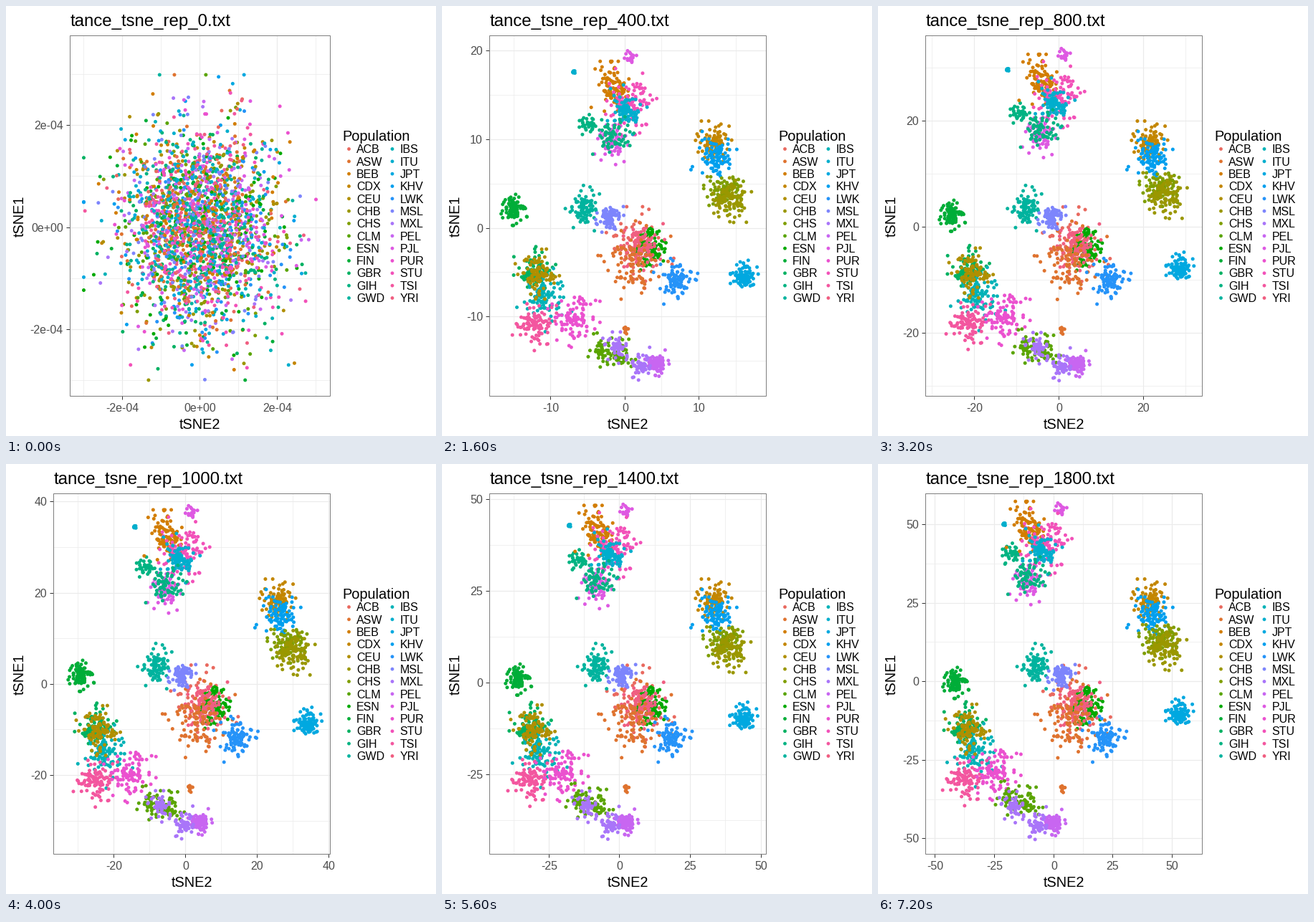
Write a matplotlib script that moves like this. It is 600 by 600 pixels and loops after 8 s.

```python
import math
from itertools import product

import matplotlib.pyplot as plt
import numpy as np
from matplotlib.animation import FuncAnimation
from matplotlib.patches import Rectangle

SIZE, FRAMES = 600, 10
PT = 0.72                      # points per pixel at 100 dpi
RIGHT, TOP, BOTTOM = 452.5, 41.5, 544.5
PER_POP = 96
CENTRE = np.array([255, 310])
plt.rcParams["font.family"] = "Liberation Sans"

NAMES = ("ACB ASW BEB CDX CEU CHB CHS CLM ESN FIN GBR GIH GWD "
         "IBS ITU JPT KHV LWK MSL MXL PEL PJL PUR STU TSI YRI").split()

# Blobs (population, x, y, radius) that drift together by (dx, dy).
GROUPS = [
    ((0, 0), [("CDX", 379, 189, 9), ("KHV", 381, 213, 12)]),
    ((-1, -14), [("CHS", 396, 259, 11), ("CHB", 401, 271, 11)]),
    ((-1, -29), [("JPT", 422, 377, 7)]),
    ((8, 21), [("FIN", 99, 284, 7)]),
    ((-8, -4), [("GBR", 129, 373, 12), ("IBS", 142, 407, 15),
                ("CEU", 133, 374, 11), ("TSI", 129, 446, 11)]),
    ((-21, -7), [("PUR", 184, 435, 13)]),
    ((-40, -14), [("CLM", 225, 480, 7.5), ("CLM", 249, 487, 7.5)]),
    ((-55, 2), [("PEL", 300, 499, 6), ("MXL", 244, 477, 7), ("MXL", 278, 500, 7.5)]),
    ((1, 1), [("ACB", 273, 337, 18), ("ESN", 291, 335, 11), ("YRI", 277, 333, 12),
              ("ASW", 266, 360, 19), ("ASW", 257, 451, 2)]),
    ((-10, 0), [("LWK", 326, 382, 11)]),
    ((22, 0), [("GWD", 199, 282, 10), ("MSL", 234, 297, 7)]),
    ((-18, -41), [("GIH", 203, 167, 6)]),
    ((-8, -8), [("PJL", 263, 72, 3), ("ITU", 184, 92, 1)]),
    ((-29, -25), [("BEB", 239, 112, 11), ("PJL", 239, 188, 11), ("STU", 265, 132, 15),
                  ("ITU", 256, 145, 11), ("GIH", 237, 183, 11)]),
]


def hcl(hue, chroma=100, lum=60):
    """Polar LUV colour as clipped sRGB."""
    a = math.radians(hue)
    u = chroma * math.cos(a) / (13 * lum) + 0.1978
    v = chroma * math.sin(a) / (13 * lum) + 0.4683
    y = ((lum + 16) / 116) ** 3
    x = 9 * y * u / (4 * v)
    z = 3 * y / v - x / 3 - 5 * y
    lin = np.clip([3.2406 * x - 1.5372 * y - 0.4986 * z,
                   -0.9689 * x + 1.8758 * y + 0.0415 * z,
                   0.0557 * x - 0.2040 * y + 1.0570 * z], 0, 1)
    return np.where(lin > 0.0031308, 1.055 * lin ** (1 / 2.4) - 0.055, 12.92 * lin)


COLORS = {n: hcl(15 + 360 * i / len(NAMES)) for i, n in enumerate(NAMES)}


def make_points():
    rng = np.random.default_rng(12)
    total = {n: 0 for n in NAMES}
    for _, blobs in GROUPS:
        for pop, _, _, r in blobs:
            total[pop] += r
    parts = []
    for drift, blobs in GROUPS:
        for pop, x, y, r in blobs:
            n = round(PER_POP * r / total[pop])
            unit = np.clip(rng.standard_t(7, (n, 2)) * 0.9, -2.8, 2.8)
            offset = unit * [r, 1.13 * r]
            mid = np.array([x, y])
            # small blobs begin flattened towards the centre of the map
            axis = (mid - CENTRE) / np.hypot(*(mid - CENTRE))
            squeeze = 0.65 if r < 8 else 0
            flat = offset - squeeze * np.outer(offset @ axis, axis)
            early = [260.5, 325] + (mid - CENTRE) * [1.04, 0.97] + flat
            start = [270.5, 309] + np.clip(rng.normal(size=(n, 2)), -3, 3) * [54, 71]
            parts.append((start, early, mid + offset, np.tile(drift, (n, 1)),
                          np.tile(COLORS[pop], (n, 1))))
    return [np.concatenate(p) for p in zip(*parts)]


START, EARLY, MID, DRIFT, POINT_COLORS = make_points()


def positions(i):
    if i < 2:
        return (START, EARLY)[i]
    return MID + DRIFT * ((i - 2) / (FRAMES - 3)) ** 0.75


def view(i):
    """Panel left edge, origin and pixels per unit on both axes."""
    if i == 0:
        return 89.5, 270.5, 541000, 309, 712500
    if i == 1:
        return 61.5, 260.5, 24.62, 325, 27.5
    width = 37.93 * i ** 0.58 - 19.35
    height = 46.8 * i ** 0.5 - 25.6
    return 66.5, 257.9 - 1.43 * i, 386 / width, 311.8 - 0.9 * i, 503 / height


def nice_step(lo, hi, want=5):
    """Tick step with the best mix of simplicity, coverage and density."""
    span = hi - lo
    power = 10 ** math.floor(math.log10(span / want))
    best = (-math.inf, 0)
    for (rank, q), zoom in product(enumerate((1, 5, 2, 2.5, 4, 3)), (1, 10)):
        step = q * power * zoom
        for near, far in product((math.floor, math.ceil), repeat=2):
            a, b = near(lo / step) * step, far(hi / step) * step
            if b <= a:
                continue
            cover = 1 - 0.5 * ((hi - b) ** 2 + (lo - a) ** 2) / (0.1 * span) ** 2 / 10 * 1
            cover = 1 - (1 - cover) * 0.1 * 10
            ratio = (max(b, hi) - min(a, lo)) / (step * (want - 1))
            dense = 2 - max(ratio, 1 / ratio)
            score = 0.25 * (1 - rank / 5) + 0.2 * cover + 0.5 * dense
            best = max(best, (score, step))
    return best[1]


def ticks(origin, scale, lo, hi):
    """Pixel, label and kind of every half step inside the panel."""
    ends = sorted([(lo - origin) / scale, (hi - origin) / scale])
    step = nice_step(*ends)
    for k in range(-12, 13):
        p = origin + scale * step * k / 2
        if lo < p < hi:
            value = k * step / 2
            name = f"{value:.0e}" if step < 1 else f"{value:.0f}"
            yield math.floor(p) + 0.5, name, k % 2 == 0


fig = plt.figure(figsize=(6, 6), dpi=100, facecolor="white")
ax = fig.add_axes([0, 0, 1, 1])


def text(x, y, s, px, color="black", **kw):
    ax.text(x, y, s, fontsize=px * PT, color=color, **kw)


def line(xs, ys, color, px):
    ax.plot(xs, ys, color=color, lw=px * PT, zorder=1, solid_capstyle="butt", snap=False)


def dots(xy, colors, px):
    return ax.scatter(xy[:, 0], xy[:, 1], s=(px * PT) ** 2, c=colors, linewidths=0, zorder=3)


def draw_legend():
    text(469.5, 187.5, "Population", 20)
    spots = []
    for i, name in enumerate(NAMES):
        col, row = divmod(i, 13)
        x, y = 478.5 + 60.5 * col, 199.5 + 17.33 * row
        spots.append((x, y))
        text(x + 10.5, y + 5.7, name, 16)
    dots(np.array(spots), [COLORS[n] for n in NAMES], 4.8)


def draw_axes(left, x0, kx, y0, ky):
    for p, name, major in ticks(x0, kx, left, RIGHT):
        line([p, p], [TOP, BOTTOM], "#ebebeb", 1.2 if major else 0.7)
        if major:
            line([p, p], [BOTTOM, BOTTOM + 5], "#333333", 1)
            text(p, 566.5, name, 16, "#4d4d4d", ha="center")
    for p, name, major in ticks(y0, -ky, TOP, BOTTOM):
        line([left, RIGHT], [p, p], "#ebebeb", 1.2 if major else 0.7)
        if major:
            line([left - 5, left], [p, p], "#333333", 1)
            text(left - 9.5, p + 5.7, name, 16, "#4d4d4d", ha="right")
    box = Rectangle((left, TOP), RIGHT - left, BOTTOM - TOP, fill=False,
                    ec="#7f7f7f", lw=PT, zorder=4, snap=False)
    ax.add_patch(box)
    text((left + RIGHT) / 2, 589.5, "tSNE2", 20, ha="center")
    text(24.5, (TOP + BOTTOM) / 2, "tSNE1", 20, rotation=90, ha="center",
         va="baseline", rotation_mode="anchor")
    return box


def update(i):
    ax.clear()
    ax.set_xlim(0, SIZE)
    ax.set_ylim(SIZE, 0)
    ax.axis("off")
    panel = view(i)
    box = draw_axes(*panel)
    text(panel[0], 28, f"tance_tsne_rep_{200 * i}.txt", 24)
    dots(positions(i), POINT_COLORS, 5).set_clip_path(box)
    draw_legend()
    return []


anim = FuncAnimation(fig, update, frames=FRAMES, interval=800,
                     init_func=lambda: [], repeat=True, repeat_delay=0)
plt.show()
```
